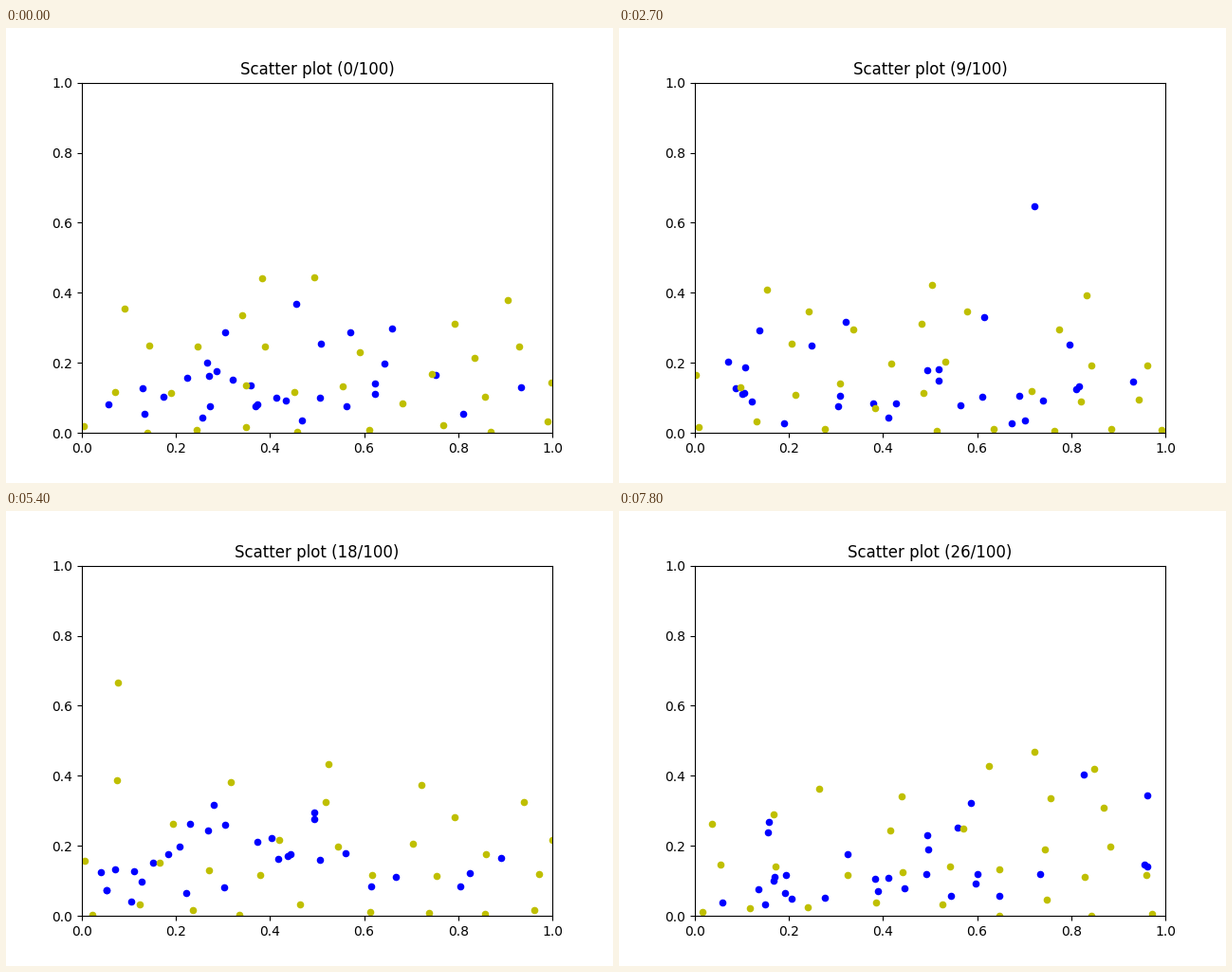
A matplotlib script that plays this animation: 640x480 px, repeating every 8000 ms.

```python
import numpy as np
import matplotlib.pyplot as plt
from matplotlib.animation import FuncAnimation

STEPS, TICK_MS, TICKS, TICKS_PER_STEP = 27, 100, 80, 3
COLUMNS, ROWS = 10, 3
COUNT = COLUMNS * ROWS
WARMUP, SWEEPS, JUMP = 200, 10, 0.04
CORE, DISC_SCALE, GAS_SCALE = 0.1, 0.05, 0.049

rng = np.random.default_rng(5)


def disc_weight(new, others):
    """Hard discs sinking under gravity."""
    if not (0 <= new[0] <= 1 and 0 <= new[1] <= 1):
        return 0
    if np.hypot(*(others - new).T).min() < CORE:
        return 0
    return np.exp(-new[1] / DISC_SCALE)


def gas_weight(new, others):
    """Free points kept a little off the walls and the floor."""
    if not (0.035 <= new[0] <= 0.97 and 0.02 <= new[1] <= 1):
        return 0
    return new[1] ** 2 * np.exp(-new[1] / GAS_SCALE)


def sweep(points, weight):
    """Offer every point one random move (Metropolis rule)."""
    for i in range(len(points)):
        others = np.delete(points, i, axis=0)
        new = points[i] + rng.normal(0, JUMP, 2)
        if rng.random() * weight(points[i], others) < weight(new, others):
            points[i] = new


def history(points, weight):
    for _ in range(WARMUP):
        sweep(points, weight)
    states = [points.copy()]
    for _ in range(STEPS - 1):
        for _ in range(SWEEPS):
            sweep(points, weight)
        states.append(points.copy())
    return states


# Discs start on a loose staggered lattice, the gas anywhere near the floor
row, column = np.divmod(np.arange(COUNT), COLUMNS)
lattice = np.column_stack([0.02 + 0.105 * column + 0.015 * (row % 2),
                           0.01 + 0.11 * row])
cloud = np.column_stack([rng.uniform(0.05, 0.95, COUNT),
                         rng.uniform(0.03, 0.3, COUNT)])
disc_states = history(lattice, disc_weight)
gas_states = history(cloud, gas_weight)

fig, ax = plt.subplots(figsize=(6.4, 4.8), dpi=100)
ax.set(xlim=(0, 1), ylim=(0, 1))
gas = ax.scatter(*gas_states[0].T, s=20, color="b")
discs = ax.scatter(*disc_states[0].T, s=20, color="y")
title = ax.set_title("")


def draw(tick):
    step = tick // TICKS_PER_STEP
    gas.set_offsets(gas_states[step])
    discs.set_offsets(disc_states[step])
    title.set_text(f"Scatter plot ({step}/100)")
    return gas, discs, title


animation = FuncAnimation(fig, draw, frames=TICKS, interval=TICK_MS,
                          repeat=True, repeat_delay=0)
plt.show()
```
